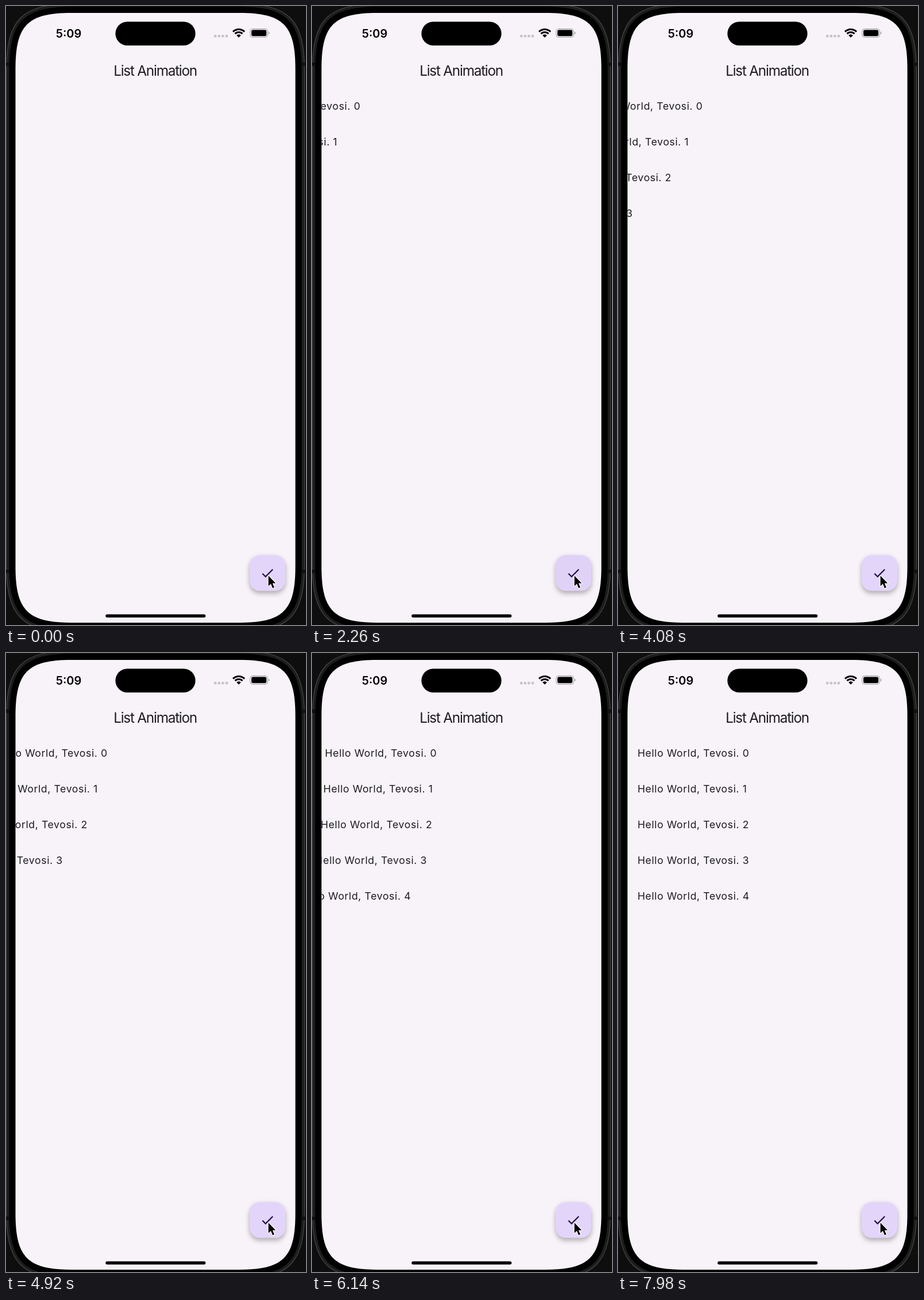
Write an HTML page that moves like this. It is 522 by 1074 pixels and loops after 8 s.

```html
<!DOCTYPE html>
<html lang="en">
<head>
<meta charset="utf-8">
<title>List Animation</title>
<style>
  html, body { margin: 0; width: 100%; height: 100%; overflow: hidden; background: #0e0e0e; }
  svg { display: block; width: 100%; height: 100%; }
  text { font-family: Inter, "Liberation Sans", sans-serif; font-optical-sizing: none; fill: #1d1b20; }
  .title { font-size: 24.3px; letter-spacing: -1.22px; text-anchor: middle; }
  .clock { font-size: 20px; font-weight: 600; text-anchor: middle; fill: #000; }
  .row { font-size: 17.7px; letter-spacing: .58px; }
  #fab { filter: drop-shadow(0 5px 4px rgba(0, 0, 0, .24)) drop-shadow(0 1px 4px rgba(0, 0, 0, .07)); }
</style>
</head>
<body>
<svg viewBox="0 0 522 1074">
  <defs><clipPath id="clip"><path data-grow="0"/></clipPath></defs>

  <!-- phone body -->
  <path data-grow="16" fill="#1d1d1d" stroke="#474747" stroke-width="1.2"/>
  <path d="M0 98h6v6h-6zM515 98h7v6h-7zM0 978h6v6h-6zM515 978h7v6h-7z" fill="#101010"/>
  <path data-grow="11"/>
  <path data-grow="0" fill="#f8f3f9"/>

  <!-- status bar -->
  <text class="clock" x="109" y="54.8">5:09</text>
  <rect x="190.4" y="27.3" width="139.2" height="41.2" rx="20.6"/>
  <g fill="#c8c2ca">
    <rect x="362" y="50" width="4.4" height="4.4" rx="1.3"/>
    <rect x="368.6" y="50" width="4.4" height="4.4" rx="1.3"/>
    <rect x="375.2" y="50" width="4.4" height="4.4" rx="1.3"/>
    <rect x="381.8" y="50" width="4.4" height="4.4" rx="1.3"/>
  </g>
  <g fill="none" stroke="#000" stroke-width="3">
    <path d="M395 44.6a14.2 14.2 0 0 1 20 0"/>
    <path d="M398.5 48.1a9.2 9.2 0 0 1 13 0"/>
  </g>
  <path d="M405 54.8l-3.8-3.9a5.4 5.4 0 0 1 7.6 0z"/>
  <rect x="424.9" y="39.6" width="30.4" height="14.6" rx="4.8" fill="none" stroke="#a8a4aa" stroke-width="1.2"/>
  <rect x="427" y="41.6" width="26.2" height="10.6" rx="3"/>
  <path d="M456.8 44.6q2 .7 2 2.3t-2 2.3z" fill="#a8a4aa"/>

  <text class="title" x="259.6" y="120.6">List Animation</text>
  <g id="list" clip-path="url(#clip)"></g>

  <rect id="fab" x="424" y="952.8" width="62" height="62" rx="17.7"/>
  <path transform="translate(441.7 970.6) scale(1.107)" fill="#21104d"
        d="M9 16.17L4.83 12l-1.42 1.41L9 19 21 7l-1.41-1.41z"/>
  <path d="M456.6 988.6V1006.4L460.8 1002.6 463.9 1009.9 466.8 1008.7 463.8 1001.4H469.2Z"
        stroke="#fff" stroke-width="2.4" stroke-linejoin="round" paint-order="stroke"/>
  <rect x="173.3" y="1055.6" width="174" height="5.4" rx="2.7"/>
</svg>

<script>
const LOOP = 8000;
const ROWS = 5;
const RADIUS = 68.6;   // screen corner
const TRAVEL = 243;    // slide distance in px
const STAGGER = 30;    // ticks between row starts
const END = 139;       // tick at which all rows arrive
const REST = [227, 213, 250];
const PRESSED = [203, 188, 223];

// Continuous-corner outline of the screen, grown by g on every side.
function outline(g) {
  const l = 16.5 - g, r = 503.5 + g, t = 12 - g, b = 1070 + g;
  const s = 1.42 * (RADIUS + g), c = 0.308 * (RADIUS + g);
  return `M${l} ${t + s}C${l} ${t + c} ${l + c} ${t} ${l + s} ${t}` +
    `H${r - s}C${r - c} ${t} ${r} ${t + c} ${r} ${t + s}` +
    `V${b - s}C${r} ${b - c} ${r - c} ${b} ${r - s} ${b}` +
    `H${l + s}C${l + c} ${b} ${l} ${b - c} ${l} ${b - s}Z`;
}

document.querySelectorAll("[data-grow]").forEach(p =>
  p.setAttribute("d", outline(+p.dataset.grow)));

const list = document.getElementById("list");
const fab = document.getElementById("fab");

const rows = Array.from({ length: ROWS }, (_, i) => {
  const row = document.createElementNS("http://www.w3.org/2000/svg", "text");
  row.setAttribute("class", "row");
  row.setAttribute("y", 180.2 + 62 * i);
  row.textContent = `Hello World, Tevosi. ${i}`;
  list.append(row);
  return row;
});

const clamp = v => Math.min(1, Math.max(0, v));

// Ticks come in threes: two short (20 ms) and one long (100 ms).
function tickAt(ms) {
  const t = ms + 20;
  return 3 * Math.floor(t / 140) + Math.min(2, Math.floor(t % 140 / 20));
}

function draw() {
  const n = tickAt(performance.now() % LOOP);
  rows.forEach((row, i) => {
    const left = clamp((END - n) / (STAGGER * (ROWS - i)));
    row.setAttribute("x", 33.9 - TRAVEL * left);
  });
  const press = clamp((n - 4) / 8) * clamp((52 - n) / 16);
  const rgb = REST.map((v, k) => Math.round(v + (PRESSED[k] - v) * press));
  fab.setAttribute("fill", `rgb(${rgb})`);
  requestAnimationFrame(draw);
}
draw();
</script>
</body>
</html>
```
